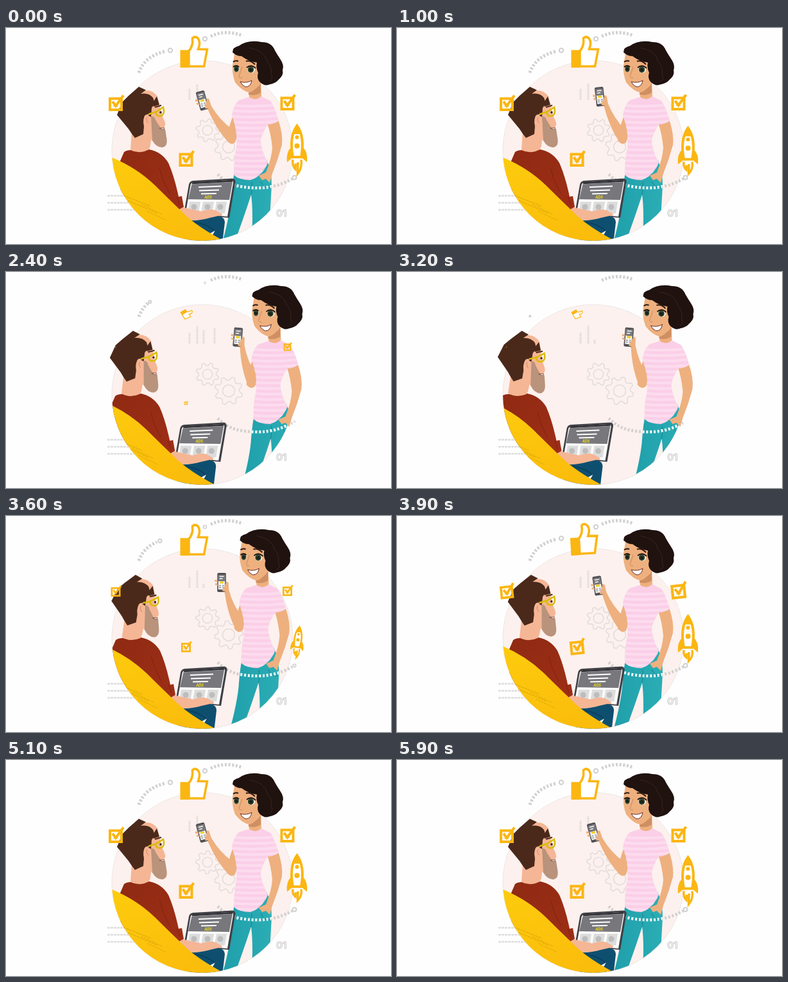
Write an HTML page that moves like this. It is 600 px wide and 338 px high and loops after 6000 ms.

```html
<!DOCTYPE html>
<html lang="en">
<head>
<meta charset="utf-8">
<title>Two people with devices</title>
<style>
html, body { margin: 0; width: 100%; height: 100%; overflow: hidden; background: #fefefe; }
svg { display: block; width: 100vw; height: 100vh; }
text { font-family: Inter, Roboto, sans-serif; font-weight: 700; }
.gold { fill: none; stroke: #fbb612; }
.gray { fill: none; stroke: #d2d0d0; }
.skin { fill: #eeb07e; }
.tan { fill: #f5b695; }
</style>
</head>
<body>
<svg viewBox="0 0 600 338" preserveAspectRatio="none">
<defs>
  <clipPath id="disc"><circle cx="306" cy="192" r="141"/></clipPath>
  <clipPath id="jeansClip"><use href="#jeans"/></clipPath>
  <clipPath id="shirtClip"><use href="#shirt"/></clipPath>
  <linearGradient id="seat" x1="0" y1="0" x2="0.5" y2="1">
    <stop offset="0" stop-color="#fdce0d"/><stop offset="1" stop-color="#fbbd0c"/>
  </linearGradient>
  <linearGradient id="wool" x1="0" y1="0" x2="1" y2="1">
    <stop offset="0" stop-color="#8f2a13"/><stop offset="1" stop-color="#a12f16"/>
  </linearGradient>
  <linearGradient id="denim" x1="0" y1="0" x2="1" y2="0">
    <stop offset="0" stop-color="#1f9faa"/><stop offset="1" stop-color="#2badb5"/>
  </linearGradient>
  <path id="jeans" d="M356 226 L406 206 Q414 222 414 246 L411 300 L403 338 H383 L384 300 Q384 274 382 261 Q374 286 364 314 L355 340 H336 Q348 296 351 268 Q353 240 356 226Z"/>
  <path id="shirt" d="M379 108 Q388 115 398 107 L412 114 Q419 124 425 145 Q417 151 408 151 Q399 164 397 176 Q397 190 408 211 Q399 232 381 238 Q364 238 355 230 Q355 204 359 188 Q361 168 356 149 L352 137 Q354 121 363 113Z"/>
  <g id="tick">
    <rect class="gold" x="-9" y="-7.500" width="18" height="17.500" stroke-width="4"/>
    <path class="gold" d="M-5 -3 L0 4 L12 -12.500" stroke-width="4"/>
    <path d="M-4 5 L4 5 L0 1Z" fill="#fbb612"/>
  </g>
</defs>

<g class="gray">
  <path id="arc1" stroke-width="5" stroke-dasharray="3 2.7"/>
  <path d="M319 13 Q342 2 369 12" stroke-width="5" stroke-dasharray="3 2.7"/>
  <circle id="dot1" r="3.2" stroke-width="2"/>
  <circle id="dot2" cx="310" cy="17" r="3.2" stroke-width="2"/>
  <path d="M158 262.500H209M158 273.500H215M158 284.500H214" stroke-width="2.400" stroke-dasharray="4 1" opacity=".7"/>
</g>

<circle cx="306" cy="192" r="141" fill="#fcf1ee" stroke="#d6cfcd" stroke-width=".8" stroke-dasharray="2 1.5"/>
<g class="gray" stroke-width="1.6" opacity=".6">
  <path id="gearA"/><path id="gearB"/>
  <path id="bars" stroke-width="3" stroke-dasharray="3 .8"/>
</g>
<text x="421" y="295" font-size="15" fill="#f8f6f6" stroke="#d2d0d0" stroke-width="1.1">01</text>
<path class="gray" d="M330 229 Q346 245 366 248 Q412 256 446 236" stroke-width="4.6" stroke-dasharray="3 2.8"/>
<g id="end" class="gray"><circle cx="449.500" cy="234" r="3" stroke-width="2"/></g>

<g id="rocket">
  <path d="M445 186 Q436 194 438 210 L446 203 H461 L469 210 Q471 194 462 186Z" fill="#fbb612"/>
  <path d="M453.500 153 Q441 170 447 202 H460 Q466 170 453.500 153Z" fill="#fff" stroke="#fbb612" stroke-width="4"/>
  <path d="M453.500 151 L447 166 H460Z" fill="#fbb612"/>
  <circle cx="453.500" cy="171" r="3" fill="#fbb612"/>
  <circle cx="453.500" cy="184.500" r="4" fill="#fbb612"/>
  <g id="flame"><path class="gold" d="M447 206 Q446 216 451 221 L451.500 212 M455 210 L454.500 228 Q462 219 460 206" stroke-width="3.400"/></g>
</g>

<g clip-path="url(#disc)"><g class="her">
  <use href="#jeans" fill="url(#denim)"/>
  <path d="M382 261 Q384 250 383 241M397 240 Q402 252 412 250" fill="none" stroke="#16828e"/>
  <g clip-path="url(#jeansClip)"><g id="belt">
    <path d="M330 229 Q346 245 366 248 Q412 256 446 236" fill="none" stroke="#f4fafa" stroke-width="4.600" stroke-dasharray="3 2.8"/>
  </g></g>
</g></g>

<g class="her">
  <path class="skin" d="M407 148 L424 143 Q432 166 430 183 Q424 206 415 228 L411 242 L405 236 L399 238 L394 231 L405 226 Q414 204 415 187 Q413 166 407 148Z"/>
  <path class="skin" d="M377 92 L397 80 L398 107 Q387 117 379 108Z"/>
  <path d="M378 100 Q391 96 397 87 V101 Q388 107 378 104Z" fill="#cf8f62"/>
  <path class="skin" d="M353 139 L366 145 Q361 167 357 179 Q351 185 344 176 Q346 158 353 139Z"/>
  <use href="#shirt" fill="#fbcfe8"/>
  <g clip-path="url(#shirtClip)"><path id="stripes" fill="none" stroke="#fcdcee" stroke-width="4"/></g>
  <g id="forearm">
    <path class="skin" d="M358 174 Q354 184 346 178 Q328 159 314 126 L311 118 L316 110 L320 122 Q333 144 352 158Z"/>
    <g transform="translate(306 113.500) rotate(-15)">
      <rect x="-6.800" y="-15" width="13.600" height="30" rx="2" fill="#505055"/>
      <rect x="-5.200" y="-12" width="10.400" height="23" fill="#f4f4f2"/>
      <path d="M-5.200 -12h10.400v10h-10.400z" fill="#77777b"/>
      <path d="M-3.500 -9.500h7M-3.500 -6h5" stroke="#fff" stroke-width="1.500"/>
      <path d="M-3 0h6" stroke="#f0d020" stroke-width="3"/>
      <path d="M-4 5h3M1 5h3M-4 8h3M1 8h3" stroke="#aaa" stroke-width="2"/>
    </g>
    <path class="skin" d="M313 110 Q317 110 317 117 L317 126 L310 126 Q311 121 312 117Z"/>
    <path class="skin" d="M299 112h-4v3h5zM300 117h-3v3h5z"/>
  </g>
  <path d="M357 35 Q379 18 402 27 Q423 35 430 61 Q434 78 419 84 Q407 94 393 82Z" fill="#1f120f"/>
  <path class="skin" d="M356 41 Q376 33 397 49 Q400 64 397 80 Q391 98 379 101 Q367 98 357 85 Q352 72 353 58Z"/>
  <path d="M353 38 Q353 30 363 28 Q377 18 398 22 Q414 22 419 35 Q423 42 427 48 Q434 58 431 66 Q433 74 426 79 Q421 87 411 88 Q404 92 396 85 Q390 79 393 70 Q389 62 391 54 Q379 53 367 44 Q359 44 353 38Z" fill="#1f120f"/>
  <path d="M379 31 Q403 35 407 52 Q415 61 413 72 Q417 79 411 84" fill="none" stroke="#3a2620"/>
  <path d="M354 53 Q358 50 362 52M374 52 Q381 50 388 57" fill="none" stroke="#2a1914" stroke-width="2"/>
  <path d="M368 61 L363 76 Q364 79 368 78" fill="none" stroke="#c98a5e"/>
  <path d="M365 84 Q375 87 383 82 Q381 93 373 92 Q368 90 365 84Z" fill="#fff" stroke="#6e2a26"/>
  <g id="open">
    <ellipse cx="359" cy="64" rx="4.500" ry="5" fill="#fff"/><ellipse cx="382" cy="65" rx="6" ry="5.200" fill="#fff"/>
    <ellipse cx="359" cy="64" rx="3.900" ry="4.900" fill="#33492f"/><ellipse cx="381.500" cy="65" rx="4.800" ry="5" fill="#33492f"/>
    <circle cx="359" cy="64.500" r="2.400" fill="#1c2119"/><circle cx="381.500" cy="65.500" r="2.800" fill="#1c2119"/>
    <path d="M354 61 Q359 57 363 61M375 62 Q382 56 389 63" fill="none" stroke="#241715" stroke-width="1.800"/>
  </g>
  <path id="shut" d="M354 66 Q359 69 363 66M375 67 Q382 71 389 67" fill="none" stroke="#2a1914" stroke-width="1.400"/>
</g>

<g clip-path="url(#disc)"><g class="him">
  <path d="M291 239 L352 235.500 Q358 235.500 357.500 241 L348 297 L277 291 L285 245 Q286 240 291 239Z" fill="#404046"/>
  <path d="M292 241.500 L350 238 Q354.500 238 354 243 L345 295 L280 289 L287.500 246 Q288.500 242 292 241.500Z" fill="#fafaf9"/>
  <path d="M289.500 244.500 L353 241 L348 269 L284 268Z" fill="#77777c"/>
  <path d="M290 242.800 L353 239.300" stroke="#333338" stroke-width="3"/>
  <path d="M300 249 L336 247.500M301 254.500 L332 253.500M304 259.500 L328 259" stroke="#fff" stroke-width="2"/>
  <text x="315" y="266.500" font-size="5.500" font-style="italic" fill="#f7e016" text-anchor="middle">ADS</text>
  <path d="M286 272h17l-3 18h-17zM307 272h17l-3 18h-17zM328 272h16l-3 18h-16z" fill="#dcdcdc"/>
  <g fill="#bdbdbd"><circle cx="293" cy="280" r="4.500"/><circle cx="314" cy="280" r="4.500"/><circle cx="334" cy="280" r="4.500"/></g>
  <path d="M271 303 Q300 294 320 293 Q341 293 341 304 L337 338 H285Z" fill="#0e4f70"/>
  <path d="M282 303 Q311 304 326 318 Q319 321 316 329" fill="none" stroke="#0a3c58" stroke-width="1.500"/>
  <path d="M313 324 L326 317 L319 329Z" fill="#fcf1ee"/>
  <path class="tan" d="M258 276 Q280 282 305 287 Q316 282 326 285 L337 291 Q337 295 331 294 L318 297 Q302 302 284 301 Q265 297 254 288Z"/>
  <path d="M184 194 Q188 191 195 191 Q209 195 223 190 Q243 194 253 211 Q262 231 269 264 L274 263 L277 280 L264 287 Q274 298 289 309 L178 260 L178 208Z" fill="url(#wool)"/>
  <path d="M239 219 Q244 240 255 259M266 264 L271 277" fill="none" stroke="#7d2411"/>
  <path d="M130 186 L166 203 Q204 219 232 246 Q256 270 280 293 Q301 313 345 336 V340 H130Z" fill="url(#seat)"/>
  <g fill="none" stroke="#b98a08" stroke-width="1" opacity=".55">
    <path d="M183 262 L226 279M190 270 L236 290" stroke-dasharray="4 1"/>
    <path d="M211 276 L244 292M220 287 L250 301" stroke-dasharray="3 1.500"/>
  </g>
</g></g>

<g class="him"><g id="head">
  <path class="tan" d="M196 160 L228 160 L225 184 L223 190 Q208 198 194 191Z"/>
  <path class="tan" d="M208 100 Q226 93 236 107 L241 128 L244 139 Q249 148 248 152 L245 158 L247 179 Q233 185 222 170 L207 148Z"/>
  <path d="M226 138 Q232 138 233 144 L240 155 L248 158 L250.500 174 Q252 185 244 187 Q234 187 228 176Z" fill="#b9937b"/>
  <path d="M239 157 L247 156 L245 159Z" fill="#fff" stroke="#7e4436" stroke-width=".8"/>
  <path d="M207 92 L218 97 L210 103 Q222 101 229 109 L232 118 L227 125 L226 139 L219 136 Q212 140 215 154 L214 166 L201 172 Q196 166 191 158 L173 136 L181 116 L191 106Z" fill="#4a291b"/>
  <path d="M228 118 L235 107 L239 120 L230 123Z" fill="#4a291b"/>
  <path class="tan" d="M222 135 Q214 134 215 145 Q216 155 224 153Z"/>
  <path d="M220 140 Q217 144 222 149" fill="none" stroke="#d08c6c"/>
  <path d="M232 124 L242 121" stroke="#4a291b" stroke-width="2.200"/>
  <circle cx="241" cy="132" r="1.700" fill="#342019"/>
  <path d="M222 135 L234 131 L245 124 Q248 133 243 137 Q234 140 233 131" fill="none" stroke="#d9bd09" stroke-width="2.500"/>
</g></g>

<g id="thumb">
  <path d="M285 36 Q292 28 290.500 16 Q294 12 299 16 Q304 22 299.500 33 L313.500 33.500 L308.500 60 H285Z" fill="#fff" stroke="#fbb612" stroke-width="3.600"/>
  <path d="M271.500 34.500h13.500v27.500h-13.500z" fill="#fbb612"/>
</g>
<use class="tick" href="#tick"/><use class="tick" href="#tick"/><use class="tick" href="#tick"/>
</svg>

<script>
const $ = id => document.getElementById(id);
const set = (el, name, value) => el.setAttribute(name, value);
const move = (el, value) => set(el, 'transform', value);
const all = cls => [...document.querySelectorAll('.' + cls)];
const her = all('her'), him = all('him'), ticks = all('tick');
const spots = [[171, 118], [280.5, 205], [438.5, 117]];
const LOOP = 6000, STEP = 100;

// smooth ramp from 0 to 1 between times a and b
function ramp(t, a, b) {
  const p = Math.min(1, Math.max(0, (t - a) / (b - a)));
  return p * p * (3 - 2 * p);
}
const trip = (t, a, b, c, d) => ramp(t, a, b) - ramp(t, c, d);
const shown = (t, a, b, c, d) => Math.max(0.001, 1 - trip(t, a, b, c, d));

// damped swing after time a
function swing(t, a) {
  const u = t - a;
  return u < 0 ? 0 : Math.exp(-u / 300) * Math.sin(Math.PI * u / 600);
}
const pivot = (x, y, angle, scale) =>
  `translate(${x} ${y}) rotate(${angle}) scale(${scale}) translate(${-x} ${-y})`;

function gear(cx, cy, r, teeth, turn) {
  const pts = [];
  for (let i = 0; i < teeth * 4; i++) {
    const a = turn + (i + 0.5) / (teeth * 4) * 2 * Math.PI;
    const k = i % 4 < 2 ? r : r * 0.76;
    pts.push((cx + k * Math.cos(a)).toFixed(2) + ' ' + (cy + k * Math.sin(a)).toFixed(2));
  }
  const h = r * 0.43;
  return `M${pts.join('L')}ZM${cx + h} ${cy}a${h} ${h} 0 1 0 ${-2 * h} 0a${h} ${h} 0 1 0 ${2 * h} 0`;
}

// first part of the left dotted arc
function arcPart(u) {
  const mix = (a, b) => a + (b - a) * u;
  const qx = mix(207, 217), qy = mix(70, 41);
  return { qx, qy, x: mix(qx, mix(217, 256)), y: mix(qy, mix(41, 35)) };
}

let lines = '';
for (let y = 120; y < 240; y += 8.6) lines += `M345 ${y}Q388 ${y + 5} 430 ${y - 1}`;
set($('stripes'), 'd', lines);

function draw(t) {
  const turn = t / LOOP * 2 * Math.PI;
  const step = 30.5 * trip(t, 1250, 2200, 3250, 3850);
  her.forEach(g => move(g, `translate(${step} 0)`));
  move($('belt'), `translate(${-step} 0)`);
  move($('forearm'), pivot(351, 178, 20 * trip(t, 500, 1600, 3300, 4250), 1));

  const lean = 20.5 * trip(t, 1600, 2900, 3250, 4100);
  him.forEach(g => move(g, `translate(${-lean} 0)`));
  move($('head'), pivot(210, 185, 5 * trip(t, 1900, 2800, 3500, 4400), 1));

  const blink = t >= 1800 && t < 2000;
  set($('open'), 'visibility', blink ? 'hidden' : 'visible');
  set($('shut'), 'visibility', blink ? 'visible' : 'hidden');

  const up = shown(t, 2100, 2600, 2950, 3600);
  move($('thumb'), pivot(271, 63, 90 * (1 - up) - 9 * swing(t, 3600), up));
  ticks.forEach((el, i) => {
    const [x, y] = spots[i], k = shown(t, 2050 + i * 80, 2450 + i * 80, 3350, 3750);
    const s = swing(t, 3750);
    move(el, `translate(${x} ${y}) rotate(${-14 * s}) scale(${k * (1 + 0.12 * (i - 1) * s)})`);
  });

  const fly = shown(t, 1950, 2450, 3300, 3800);
  move($('rocket'), `translate(0 ${4 * Math.sin(2 * turn)})` + pivot(454, 200, 20 * (1 - fly), fly));
  move($('flame'), pivot(454, 206, 0, `1 ${0.9 + 0.1 * Math.cos(10 * turn)}`).replace(/--/g, '-'));

  const grow = shown(t, 2100, 2700, 3150, 3800), a = arcPart(grow * 0.9), b = arcPart(grow);
  set($('arc1'), 'd', `M207 70Q${a.qx} ${a.qy} ${a.x} ${a.y}`);
  set($('dot1'), 'cx', b.x);
  set($('dot1'), 'cy', b.y);
  set($('dot1'), 'r', 1 + 2.2 * grow);
  move($('dot2'), pivot(310, 17, 0, grow));
  move($('end'), pivot(449.5, 234, 0, grow));

  set($('gearA'), 'd', gear(314, 160, 18, 8, turn));
  set($('gearB'), 'd', gear(347, 186, 22, 8, -turn + 0.3));
  const extra = trip(t, 1100, 1700, 2300, 3000);
  set($('bars'), 'd', `M286 112V95M298 112V${86 + 2 * Math.cos(turn)}M308 112V${106 - 16 * extra}` +
    (extra > 0.02 ? `M325 112V${112 - 26 * extra}` : ''));
}

const start = performance.now();
function tick(now) {
  const t = Math.max(0, now - start) % LOOP;
  draw(Math.floor(t / STEP) * STEP);
  requestAnimationFrame(tick);
}
draw(0);
requestAnimationFrame(tick);
</script>
</body>
</html>
```
